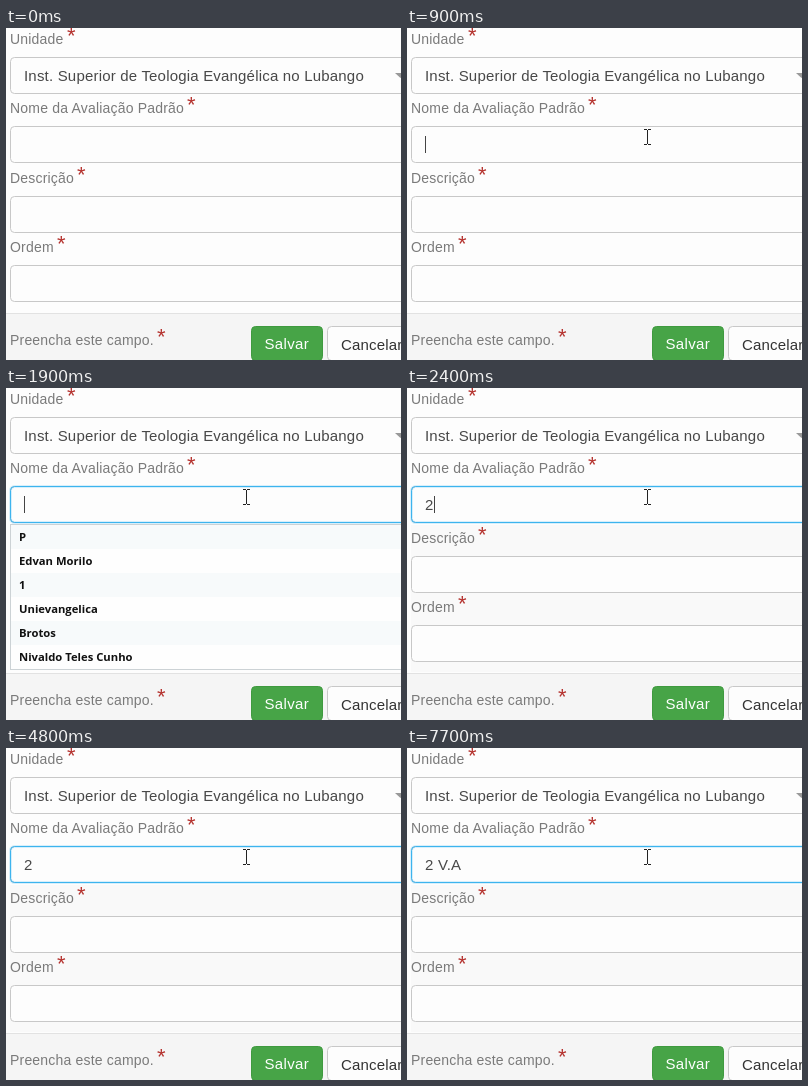
Recreate the animation shown at these times as an HTML page. Size 395 px wide and 332 px high, loop 8000 ms.

```html
<!DOCTYPE html>
<html lang="pt">
<head>
<meta charset="utf-8">
<title>Formulário</title>
<style>
  html, body { margin: 0; width: 100%; height: 100%; overflow: hidden; }
  svg { display: block; font: 14px "Liberation Sans", Arial, sans-serif; letter-spacing: .19px; }
  .label { fill: #7a7a7a; }
  .star { fill: #b5332f; font-size: 22px; }
  .value { fill: #484848; font-size: 15px; }
  .field { fill: #fdfdfd; stroke: #c8c8c8; }
  .option { fill: #111; font: bold 11.25px "Open Sans", sans-serif; letter-spacing: 0; }
</style>
</head>
<body>
<svg width="395" height="332" viewBox="0 0 395 332">
  <rect width="395" height="332" fill="#fdfdfd"/>
  <rect id="shade" x="4" y="137" width="391" height="147" fill="#f9f9f9"/>
  <rect y="285" width="395" height="47" fill="#f5f5f5"/>
  <path d="M0 285.5H395" stroke="#e2e2e2"/>
  <g id="form"></g>
  <path d="M389 45h11l-5.500 5z" fill="#999"/>
  <text class="value" x="18" y="53">Inst. Superior de Teologia Evangélica no Lubango</text>

  <rect x="245.500" y="298.500" width="71" height="34" rx="4" fill="#47a447" stroke="#3f9a3f"/>
  <text class="value" x="258.500" y="321" style="fill:#fff;letter-spacing:.35px">Salvar</text>
  <rect class="field" x="321.500" y="298.500" width="90" height="34" rx="4"/>
  <text class="value" x="335" y="322" style="fill:#333">Cancelar</text>

  <g id="focus" fill="none" stroke="#3db4ee">
    <rect x="4.500" y="98.500" width="400" height="36" rx="4" stroke-width="3" opacity=".2"/>
    <rect x="4.500" y="98.500" width="400" height="36" rx="4"/>
  </g>
  <g id="list"></g>
  <text id="typed" class="value" x="18" y="122" xml:space="preserve"></text>
  <rect id="caret" y="108" width="1" height="17" fill="#444"/>
  <path id="arrow" d="M.5.5V16.500L4.200 13 6.700 18.500 9 17.500 6.600 12.200H11.700z" fill="#fff" stroke="#111"/>
  <path id="beam" d="M-3-7.500H0M1-7.500H4M.5-7V7M-3 7.500H0M1 7.500H4" fill="none" stroke="#222"/>
</svg>
<script>
const $ = id => document.getElementById(id);
const show = (el, on) => el.setAttribute("visibility", on ? "visible" : "hidden");
const text = (cls, x, y, s) => `<text class="${cls}" x="${x}" y="${y}">${s}</text>`;

// label, baseline, asterisk x, field top
$("form").innerHTML = [
  ["Unidade", 16, 61, 29],
  ["Nome da Avaliação Padrão", 85, 181, 98],
  ["Descrição", 155, 71, 168],
  ["Ordem", 224, 51, 237],
  ["Preencha este campo.", 317, 151]
].map(([name, y, starX, top]) =>
  text("label", 4, y, name) + text("star", starX, y - 1.5, "*") +
  (top ? `<rect class="field" x="4.500" y="${top + .5}" width="400" height="36" rx="4"/>` : "")
).join("");

$("list").innerHTML =
  '<rect x="4.500" y="136.500" width="400" height="145" fill="#fefefe" stroke="#ccd2d5"/>' +
  ["P", "Edvan Morilo", "1", "Unievangelica", "Brotos", "Nivaldo Teles Cunho"].map((s, i) =>
    (i % 2 ? "" : `<rect x="5" y="${137 + 24 * i}" width="390" height="24" fill="#f7fafb"/>`) +
    text("option", 13, 153 + 24 * i, s)).join("");

// time, x, y of the mouse
const path = [[100, 349, 43], [200, 323, 51], [300, 299, 64], [400, 271, 79],
              [500, 257, 105], [600, 246, 108], [700, 240, 109]];
// time, typed text, caret x
const typing = [[0, "", 18], [2400, "2", 27], [4300, "2 ", 31],
                [5300, "2 V", 41], [6900, "2 V.", 44], [7200, "2 V.A", 54]];
// the caret toggles at each of these times
const blinks = [900, 1400, 1900, 2900, 3400, 3900, 4300, 4800, 5300, 5800, 6200, 6700, 6900, 7700];
const latest = (steps, t) => steps.filter(s => s[0] <= t).pop();

function draw(t) {
  const mouse = latest(path, t);
  const inField = mouse && mouse[2] > 98;
  show($("arrow"), mouse && !inField);
  show($("beam"), inField);
  if (mouse) $(inField ? "beam" : "arrow").setAttribute("transform", `translate(${mouse[1]} ${mouse[2]})`);

  show($("focus"), t >= 1000);
  show($("list"), t >= 1000 && t < 2400);
  show($("shade"), t >= 2400);

  const [, typed, x] = latest(typing, t);
  $("typed").textContent = typed;
  $("caret").setAttribute("x", x);
  show($("caret"), blinks.filter(b => b <= t).length % 2);
}

function tick() {
  draw(performance.now() % 8000);
  requestAnimationFrame(tick);
}
tick();
</script>
</body>
</html>
```
